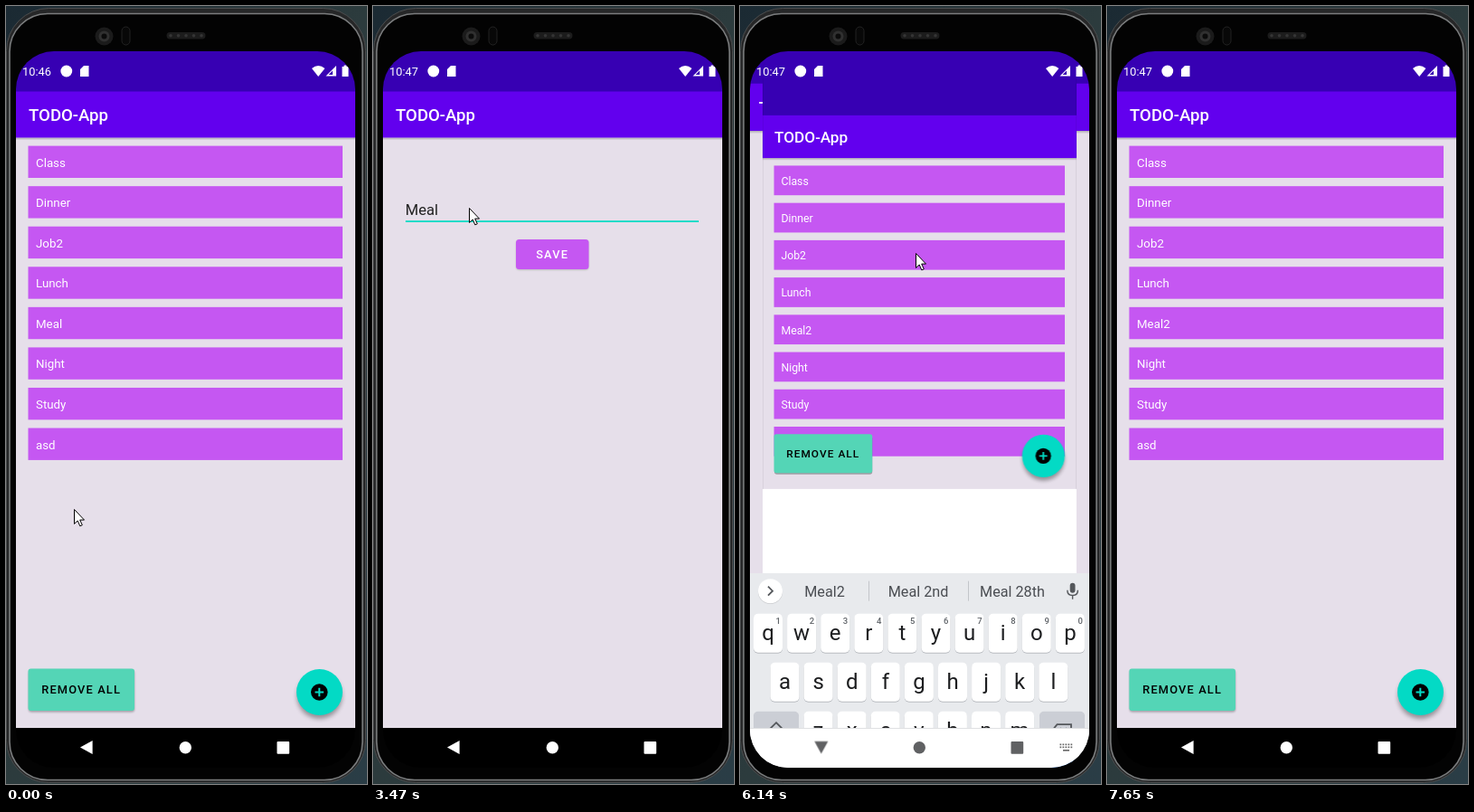
Animation of 399 by 860 pixels, one loop 8690 ms. Source, as an HTML page:

```html
<!DOCTYPE html>
<html lang="en">
<head>
<meta charset="utf-8">
<title>To-do list on a phone</title>
<style>
  html, body { margin: 0; width: 100%; height: 100%; overflow: hidden; background: #000; }
  svg { display: block; width: 399px; height: 860px; font-family: Roboto, sans-serif; }
  .activity { transform-origin: 198.5px 446px; }
  .title { font-size: 18.6px; font-weight: 500; fill: #fff; }
  .item { font-size: 13.3px; fill: #fff; }
  .button { font-size: 12.8px; font-weight: 500; letter-spacing: 1.15px; }
  .field { font-size: 16.6px; fill: #222; }
  .key { font-size: 24px; fill: #1d1e20; text-anchor: middle; }
  .small { font-size: 16px; fill: #3c4043; }
  .hint { font-size: 9.5px; font-weight: 500; fill: #5f6368; text-anchor: middle; }
  .word { font-size: 16.2px; fill: #4a4d52; text-anchor: middle; }
  .gif { font-size: 12.5px; font-weight: 900; fill: #54575b; text-anchor: middle; letter-spacing: .6px; }
  .line { fill: none; stroke: #54575b; stroke-width: 1.8; }
  .thin { fill: none; stroke: #54575b; stroke-width: 1.4; }
  #back { transform-origin: 89.4px 819.1px; }
</style>
</head>
<body>
<svg id="stage" viewBox="0 0 399 860"></svg>
<script>
const LOOP = 8690, TICK = 120;
const LILAC = '#c557f2', TEAL = '#03dac5', PAPER = '#e6dfea', INK = '#54575b';
const KEY_PITCH = 37.1, ROW_PITCH = 44.56;

const rect = (x, y, w, h, fill, rx = 0, extra = '') =>
  `<rect x="${x}" y="${y}" width="${w}" height="${h}" rx="${rx}" fill="${fill}" ${extra}/>`;
const circle = (x, y, r, fill, extra = '') =>
  `<circle cx="${x}" cy="${y}" r="${r}" fill="${fill}" ${extra}/>`;
const path = (d, extra = '') => `<path d="${d}" ${extra}/>`;
const text = (x, y, cls, content, extra = '') =>
  `<text x="${x}" y="${y}" class="${cls}" ${extra}>${content}</text>`;
const group = (id, content, extra = '') => `<g id="${id}" ${extra}>${content}</g>`;
const repeat = (count, draw) => Array.from({ length: count }, (_, i) => draw(i)).join('');

const defs = `<defs>
  <clipPath id="screen"><rect x="11" y="50" width="375" height="792" rx="42"/></clipPath>
  <linearGradient id="edge" x2="0" y2="1">
    <stop stop-color="#000" stop-opacity=".25"/><stop offset="1" stop-color="#000" stop-opacity="0"/>
  </linearGradient>
  <linearGradient id="room" x2="1" y2="1">
    <stop stop-color="#1b2a33"/><stop offset=".5" stop-color="#2c3b3d"/><stop offset="1" stop-color="#2a3d46"/>
  </linearGradient>
  <filter id="soft" x="-30%" y="-40%" width="160%" height="190%"><feGaussianBlur stdDeviation="2.5"/></filter>
  <filter id="tight" x="-10%" y="-20%" width="120%" height="150%"><feGaussianBlur stdDeviation=".8"/></filter>
</defs>`;

const phone = () => rect(0, 0, 399, 860, 'url(#room)')
  + rect(.5, 2.5, 397, 856, '#262728', 47, 'stroke="#4c4e4f"')
  + rect(4, 8.5, 390, 847, '#030303', 42, 'stroke="#7b7d7e" stroke-width="1.6"')
  + circle(108.5, 33.5, 10, '#1b1b1b') + circle(108.5, 33.5, 6, '#303030') + circle(108.5, 33.5, 3, '#0b0b0b')
  + rect(128, 23, 9, 20, '#080808', 4.5, 'stroke="#232323"')
  + rect(177.5, 29, 43, 7.5, '#1c1c1c', 3.7)
  + repeat(5, i => circle(182 + i * 8.5, 32.7, 1.8, '#353535'));

const appFrame = () =>
  rect(11, 50, 375, 792, '#000')
  + rect(11, 145, 375, 653, PAPER)
  + rect(11, 145.5, 375, 3, 'url(#edge)')
  + rect(11, 50, 375, 45, '#3700b3')
  + rect(11, 94.5, 375, 51, '#6200ee')
  + text(25, 127.3, 'title', 'TODO-App');

function listScreen(id, meal) {
  const rows = ['Class', 'Dinner', 'Job2', 'Lunch', meal, 'Night', 'Study', 'asd'].map((name, i) => {
    const y = 154.6 + i * ROW_PITCH;
    return rect(24.5, y, 347.5, 35.4, LILAC) + text(33, y + 23, 'item', name);
  }).join('');
  const actions =
    rect(25, 734.5, 117, 46, '#000', 3, 'opacity=".3" filter="url(#tight)"')
    + rect(24.5, 732.5, 117.5, 46.5, '#54d5b6', 3)
    + text(39.3, 760.4, 'button', 'REMOVE ALL')
    + circle(346.5, 763, 25, '#000', 'opacity=".35" filter="url(#soft)"')
    + circle(346.5, 758.5, 25.5, TEAL)
    + circle(346.3, 758.5, 9.3, '#000')
    + path('M341.5 758.5h9.6m-4.8-4.8v9.6', `stroke="${TEAL}" stroke-width="2"`);
  return group(id, appFrame() + rows
    + group(id + 'Blank', rect(11, 541, 375, 257, '#fff'), 'visibility="hidden"')
    + group(id + 'Actions', actions), 'class="activity"');
}

const editScreen = () => group('edit', appFrame()
  + text(35.7, 230.8, 'field', 'Meal<tspan id="digit">2</tspan>')
  + rect(36.5, 232.3, 35.5, 1, '#333', 0, 'id="underline"')
  + rect(72, 232.3, 9, 1, '#333', 0, 'id="underlineEnd"')
  + rect(36, 237.2, 324, 1.8, TEAL)
  + rect(71.8, 213, 1.7, 23, TEAL, 0, 'id="caret"')
  + rect(158.5, 259.5, 79.5, 32, '#000', 3, 'opacity=".25" filter="url(#tight)"')
  + rect(158, 260, 80.5, 34, '#000', 4, 'id="lift" filter="url(#soft)"')
  + rect(158, 258, 80.5, 33, LILAC, 3.5)
  + text(180.2, 279.2, 'button', 'SAVE', 'fill="#fff"')
  + rect(158, 258, 80.5, 33, '#fff', 3.5, 'id="press"'), 'class="activity"');

function keyboard() {
  const GREY = '#cbced5';
  const key = (x, y, w, fill = '#fff') =>
    rect(x, y + 1, w, 43, '#b9bcc1', 5) + rect(x, y, w, 43, fill, 5);
  const letters = (chars, x, y) => repeat(chars.length, i =>
    key(x + i * KEY_PITCH - 16, y, 32) + text(x + i * KEY_PITCH, y + 29, 'key', chars[i]));
  const bar = x => rect(x, 550, 1, 22, '#c3c6ca');
  const line = (d, cls = 'line') => path(d, `class="${cls}"`);

  const tools = line('M36 556l-5 5 5 5')
    + circle(81.5, 559, 4.8, 'none', 'class="line"') + line('M85 562.5l6 6')
    + line('M131 554h12.5v9l-4.5 4.5h-8.500zM143.5 563H139v4.5M134 561q2.5 4 5 0'.replace('8.500', '8'), 'thin')
    + text(191.5, 565, 'gif', 'GIF')
    + line('M240 555h13v14h-13z') + rect(243.5, 552.5, 6, 4, INK, 1)
    + line('M243 560h7m-7 3h7m-7 3h4.5', 'thin')
    + bar(279) + repeat(3, i => circle(307.5 + i * 5.5, 561, 1.9, INK));
  const words = line('M31 556l5 5-5 5') + bar(142) + bar(252)
    + text(93.5, 567, 'word', 'Meal2') + text(197, 567, 'word', 'Meal 2nd') + text(301, 567, 'word', 'Meal 28th');
  const mic = rect(364.7, 552, 5.8, 11, INK, 2.9)
    + line('M361.8 560q0 5.8 5.8 5.8t5.8-5.8m-5.8 6v4', 'thin');
  const smile = circle(123.3, 769, 8.3, 'none', 'class="line"')
    + circle(120.3, 766.5, 1.3, INK) + circle(126.3, 766.5, 1.3, INK)
    + line('M118.8 771q4.5 5.5 9 0', 'thin');

  return group('keyboard', rect(11, 541, 375, 260, '#e8eaed')
    + circle(33.5, 561.8, 13.6, '#c9cbce') + circle(33.5, 561, 13.5, '#fff')
    + group('tools', tools) + group('words', words) + mic
    + letters('qwertyuiop', 31, 586)
    + repeat(10, i => text(42.3 + i * KEY_PITCH, 597.5, 'hint', (i + 1) % 10))
    + letters('asdfghjkl', 49.5, 640)
    + key(15, 694, 50, GREY) + letters('zxcvbnm', 86.5, 694) + key(331, 694, 50, GREY)
    + line('M40 706.5l9 9h-4.5v8.5h-9v-8.5H31z')
    + line('M350.5 708.5H366V723h-15.5l-6-7.2zm3.5 4l7 7m0-7l-7 7')
    + key(15, 747.5, 50, GREY) + key(71, 747.5, 31.5, GREY) + key(107.5, 747.5, 31.5)
    + key(145, 747.5, 143.5) + key(294, 747.5, 31.5, GREY) + key(331, 747.5, 50, '#1a73e8')
    + text(40, 775, 'key small', '?123') + text(86.7, 779, 'key', ',') + text(309.5, 779, 'key', '.')
    + smile + path('M348.5 769.5l5 5 10-10', 'fill="none" stroke="#fff" stroke-width="1.8"'));
}

const navigation = () =>
  group('navLight', rect(11, 798, 375, 44, '#fff') + rect(11, 798, 375, 1, '#dfe0e2')
    + repeat(10, i => rect(353.5 + i % 5 * 3, 815.5 + (i > 4) * 3, 1.7, 1.7, '#666'))
    + rect(357, 822, 7, 1.6, '#666'))
  + group('navIcons', path('M82 819.5l13.6-7.5v15z', 'id="back"')
    + `<circle cx="198.3" cy="819.7" r="6.7"/><rect x="299.5" y="813" width="13.7" height="13.7" rx="1"/>`);

const statusBar = () => `<g fill="#fff" font-size="12.8">`
  + text(18, 77.2, '', '10:46', 'id="clockBefore"') + text(18, 77.2, '', '10:47', 'id="clockAfter"')
  + circle(66.8, 72, 6.4, '#fff')
  + path('M86 66h5.5v12h-9.5v-8z')
  + path('M338 69q7.2-6 14.4 0l-7.2 9z')
  + path('M365 66v11.5h-11.5z') + path('M361 71.5v4.5h-4.5z', 'fill="#3700b3"')
  + path('M373.5 65.5h3V67h2v11h-7V67h2z') + '</g>';

const pointer = () => path('M.5.5v16l3.7-3.5 2.6 5.9 2.5-1.1-2.6-5.7h4.8z',
  'id="pointer" fill="#fff" stroke="#000"');

document.getElementById('stage').innerHTML = defs + phone()
  + '<g clip-path="url(#screen)">'
  + listScreen('before', 'Meal')
  + rect(11, 50, 375, 792, '#000', 0, 'id="dim" opacity=".25"')
  + editScreen() + listScreen('after', 'Meal2')
  + statusBar() + keyboard() + navigation() + '</g>' + pointer();

// Each move [time, value, jumps] reaches its value in equal jumps, one per tick.
function track(id, property, initial, moves) {
  const at = time => Math.max(0, time - 1) / LOOP;
  const frames = [{ offset: 0, [property]: initial }];
  let value = initial;
  for (const [time, next, jumps = 1] of moves) {
    frames.push({ offset: at(time), [property]: value, easing: `steps(${jumps}, start)` });
    frames.push({ offset: at(time + jumps * TICK), [property]: next });
    value = next;
  }
  frames.push({ offset: 1, [property]: value });
  document.getElementById(id).animate(frames, { duration: LOOP, iterations: Infinity });
}

function show(id, from, to) {
  const moves = from ? [[from, 'visible']] : [];
  if (to) moves.push([to, 'hidden']);
  track(id, 'visibility', from ? 'hidden' : 'visible', moves);
}

const shift = (x, y) => `translate(${x}px, ${y}px)`;
const turn = angle => `rotate(${angle}deg)`;

// The share of an activity change still to go decays from tick to tick.
const remaining = i => i < 3 ? .5 * .15 ** i : 0;
const zoom = start => scale => [0, 1, 2, 3].map(i => [start + i * TICK, `scale(${scale(remaining(i))})`]);
const entering = left => 1 - .15 * left;
const leaving = left => 1.05 - .05 * left;

const OPEN = 1970, TYPE = 4220, RAISE = 4340, SUGGEST = 4730, PRESS = 5640, CLOSE = 6140;
const SETTLED = CLOSE + 2 * TICK, RESIZED = CLOSE + 3 * TICK;

show('before', 0, OPEN + 3 * TICK);
show('dim', OPEN, OPEN + 3 * TICK);
show('edit', OPEN, SETTLED);
show('after', CLOSE);
show('afterBlank', CLOSE, RESIZED);
track('before', 'transform', 'scale(1)', zoom(OPEN)(leaving));
track('edit', 'transform', 'scale(1)', [...zoom(OPEN)(entering), ...zoom(CLOSE)(leaving)]);
track('after', 'transform', 'scale(1)', zoom(CLOSE)(entering));
track('afterActions', 'transform', shift(0, -257), [[RESIZED, shift(0, 0)]]);

show('clockBefore', 0, 2450);
show('clockAfter', 2450);

show('digit', TYPE, SETTLED);
show('underline', TYPE, SETTLED);
show('underlineEnd', SUGGEST, SETTLED);
track('caret', 'transform', shift(0, 0), [[TYPE, shift(9.2, 0)]]);
track('caret', 'opacity', 1, [2470, 3470, 5120].flatMap(off => [[off, 0], [off + 500, 1]]));
track('press', 'opacity', 0, [[PRESS, .17, 3]]);
track('lift', 'opacity', 0, [[PRESS, .14, 3]]);

show('keyboard', RAISE, SETTLED);
show('navLight', RAISE, SETTLED);
show('tools', RAISE, SUGGEST);
show('words', SUGGEST, SETTLED);
track('keyboard', 'transform', shift(0, 257), [[RAISE, shift(0, 0), 2], [CLOSE, shift(0, 257), 3]]);
track('navIcons', 'fill', '#fff', [[RAISE, '#606163'], [SETTLED, '#dad3de'], [RESIZED, '#fff']]);
track('back', 'transform', turn(0), [[4610, turn(-90), 4], [CLOSE + TICK, turn(0), 4]]);

show('pointer', 0, 7650);
track('pointer', 'transform', shift(75, 556), [
  [120, shift(75, 540)], [270, shift(81, 454), 2], [540, shift(109, 418)],
  [700, shift(131, 385)], [820, shift(99, 331), 2], [1090, shift(82, 345)],
  [2450, shift(117, 215), 3], [3090, shift(106, 223)],
  [4850, shift(122, 236), 2], [5120, shift(194, 273), 3],
  [6870, shift(75, 360), 3], [7260, shift(127, 709), 2], [7530, shift(212, 785)]
]);
</script>
</body>
</html>
```
